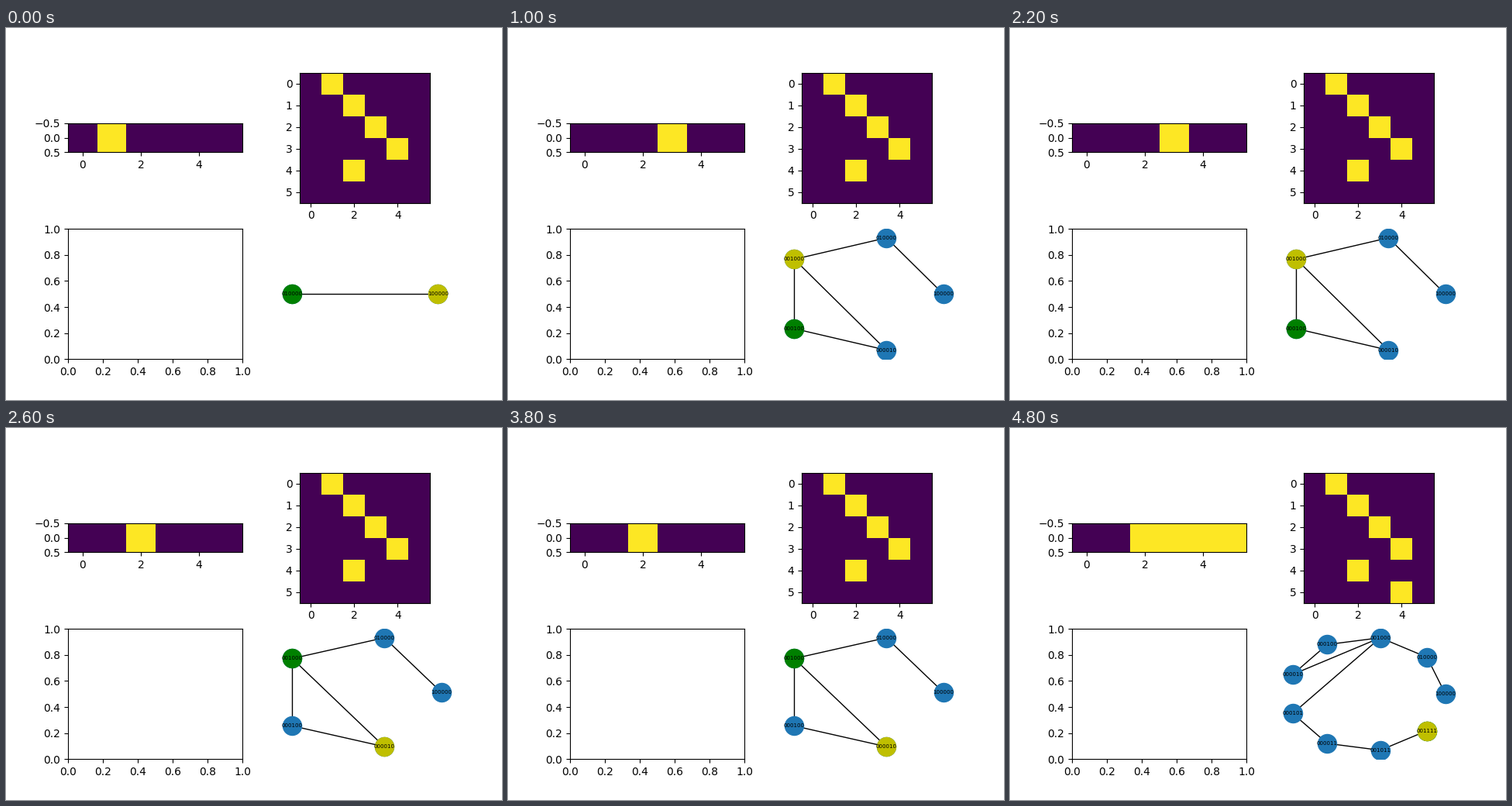
These frames come from a looping animation (640x480 px, 8000 ms). A matplotlib script:

```python
import numpy as np
import matplotlib.pyplot as plt
from matplotlib.animation import FuncAnimation
from matplotlib.collections import LineCollection

FRAMES, STEP_MS = 40, 200
EVENT = 20              # unit 5 is switched on and wired to unit 4
SIZE = 6
NODE_AREA = 300
MARGIN = 0.05


def label(state):
    return "".join(str(v) for v in state)


def weights(step):
    w = np.zeros((SIZE, SIZE), int)
    w[[0, 1, 2, 3, 4], [1, 2, 3, 4, 2]] = 1
    if step >= EVENT:
        w[5, 4] = 1
    return w


def run():
    """States from the start, one more than there are frames."""
    state = np.eye(SIZE, dtype=int)[0]
    states = [state]
    for step in range(FRAMES):
        state = np.minimum(state @ weights(step), 1)
        if step >= EVENT:
            state[5] = 1
        states.append(state)
    return states


STATES = run()
NAMES = [label(s) for s in STATES]

fig, ((bar_ax, mat_ax), (empty_ax, net_ax)) = plt.subplots(
    2, 2, figsize=(6.4, 4.8), dpi=100)

bar = bar_ax.imshow(STATES[1][None, :], vmin=0, vmax=1)
bar_ax.set_xticks([0, 2, 4])
bar_ax.set_yticks([-0.5, 0, 0.5])
mat = mat_ax.imshow(weights(0), vmin=0, vmax=1)
mat_ax.set_xticks([0, 2, 4])
mat_ax.set_yticks(range(SIZE))

box = net_ax.get_position()
NET_PX = np.array([box.width * 640, box.height * 480])


def circle(n):
    a = 2 * np.pi * np.arange(n) / n
    return np.column_stack([np.cos(a), np.sin(a)])


def view(pos, marks):
    """Limits that grow as each highlighted node is laid on top."""
    radius = np.sqrt(NODE_AREA) / 2 / NET_PX
    lo, hi = pos.min(axis=0) - radius, pos.max(axis=0) + radius
    for p in marks:
        reach = radius * (hi - lo) * (1 + 2 * MARGIN)
        lo, hi = np.minimum(lo, p - reach), np.maximum(hi, p + reach)
    pad = MARGIN * (hi - lo)
    return lo - pad, hi + pad


def draw_net(step):
    seen = NAMES[:step + 2]
    nodes = list(dict.fromkeys(seen))
    xy = circle(len(nodes))
    pos = dict(zip(nodes, xy))
    now, before = pos[seen[-1]], pos[seen[-2]]
    links = {tuple(sorted(e)) for e in zip(seen, seen[1:]) if e[0] != e[1]}

    net_ax.clear()
    net_ax.set_axis_off()
    net_ax.add_collection(LineCollection(
        [(pos[a], pos[b]) for a, b in sorted(links)],
        colors="k", linewidths=1, zorder=1))
    net_ax.scatter(*xy.T, s=NODE_AREA, c="#1f77b4", zorder=2)
    net_ax.scatter(*now, s=NODE_AREA, c="g", zorder=2)
    net_ax.scatter(*before, s=NODE_AREA, c="y", zorder=2)
    for name, p in pos.items():
        net_ax.text(*p, name, size=5, ha="center", va="center", clip_on=True)

    lo, hi = view(xy, [now, before])
    net_ax.set_xlim(lo[0], hi[0])
    net_ax.set_ylim(lo[1], hi[1])


def update(step):
    bar.set_data(STATES[step + 1][None, :])
    mat.set_data(weights(step))
    draw_net(step)
    return []


anim = FuncAnimation(fig, update, frames=FRAMES, interval=STEP_MS,
                     init_func=lambda: update(0), repeat=True, repeat_delay=0)
plt.show()
```
